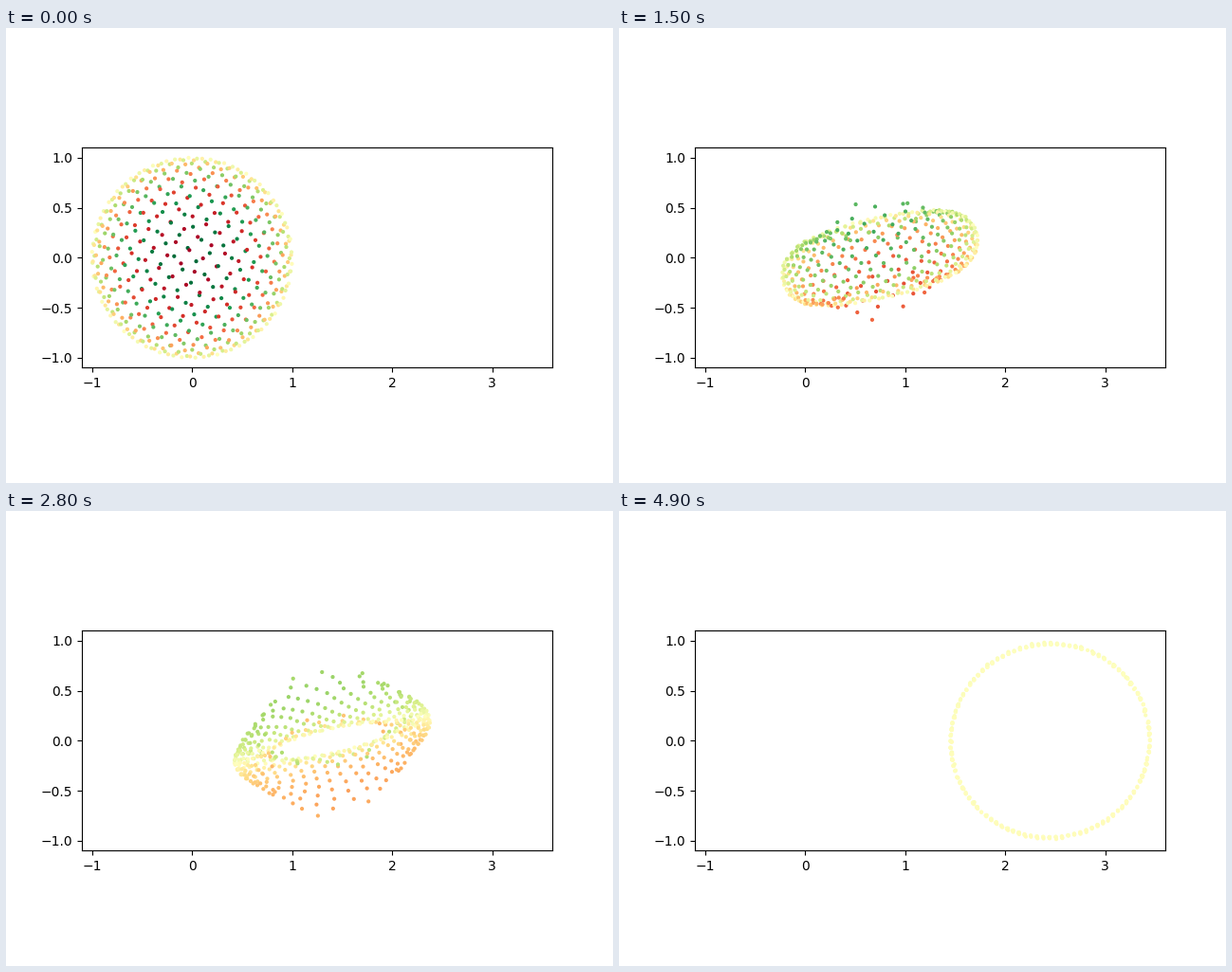
These frames come from a looping animation (640x480 px, 5 s). A matplotlib script:

```python
import numpy as np
import matplotlib.pyplot as plt
from matplotlib.animation import FuncAnimation

FRAMES = 50
SPHERE_POINTS = 500
CIRCLE_POINTS = 100
SHIFT = np.array([2.5, 0, 0])


def fibonacci_sphere(n, phase):
    """Golden-angle spiral wound around the x axis."""
    i = np.arange(n)
    x = (2 * i + 1) / n - 1
    r = np.sqrt(1 - x**2)
    theta = phase - i * np.pi * (3 - np.sqrt(5))
    return np.column_stack([x, r * np.sin(theta), r * np.cos(theta)])


def unit(v):
    return v / np.linalg.norm(v)


def circle_targets(points):
    """Project along a tilted pole and snap the angle to evenly spaced nodes."""
    tilt = np.radians(14)
    pole = unit(np.array([-0.05, 0.53, 0.85]))
    axis = np.array([np.cos(tilt), np.sin(tilt), 0])
    axis = unit(axis - axis.dot(pole) * pole)
    side = np.cross(axis, pole)
    angle = tilt + np.arctan2(points @ side, points @ axis)
    step = 2 * np.pi / CIRCLE_POINTS
    angle = np.round(angle / step) * step
    return np.column_stack([np.cos(angle), np.sin(angle), np.zeros_like(angle)])


start = fibonacci_sphere(SPHERE_POINTS, np.radians(110))
end = circle_targets(start) + SHIFT

fig, ax = plt.subplots(figsize=(6.4, 4.8), dpi=100)
ax.set_aspect("equal")
ax.set_xlim(-1.1, 3.6)
ax.set_ylim(-1.1, 1.1)
dots = ax.scatter(start[:, 0], start[:, 1], c=start[:, 2], s=4,
                  cmap="RdYlGn", vmin=-1, vmax=1)


def update(frame):
    t = frame / FRAMES
    points = (1 - t) * start + t * end
    dots.set_offsets(points[:, :2])
    dots.set_array(points[:, 2])
    return (dots,)


anim = FuncAnimation(fig, update, frames=FRAMES, interval=100, repeat=True)
plt.show()
```
